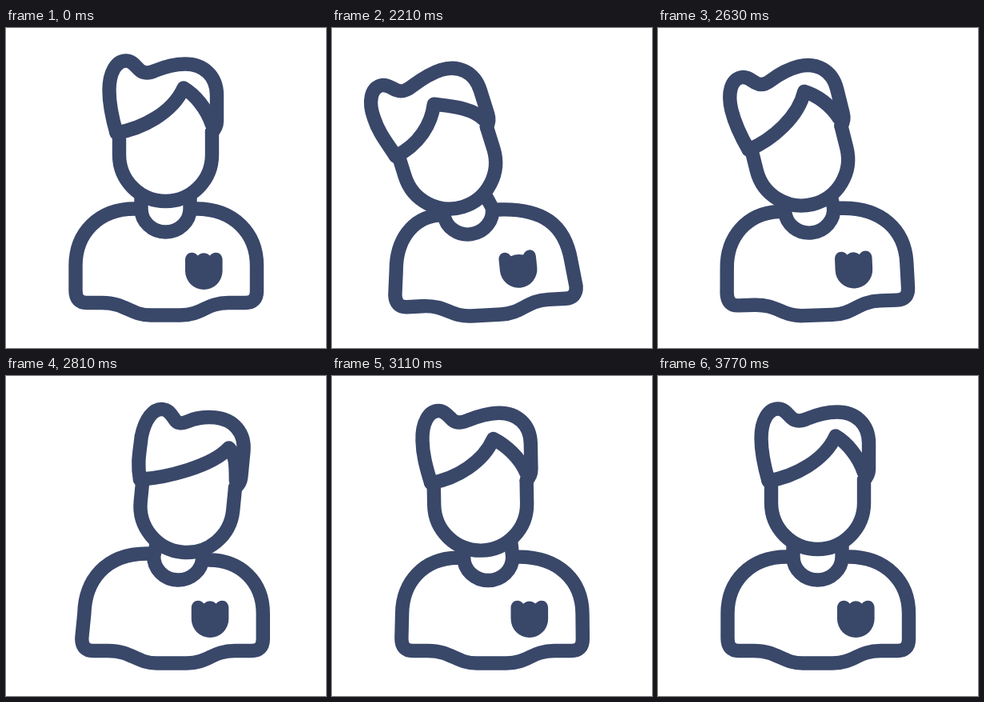
Write an HTML page that moves like this. It is 400x400 px and loops after 3800 ms.

```html
<!DOCTYPE html>
<html>
<head>
<meta charset="utf-8">
<style>
html, body { margin: 0; width: 100%; height: 100%; overflow: hidden; background: #fff; }
svg { display: block; width: 100%; height: 100%; }
path { fill: none; stroke: #394769; stroke-width: 17.4; stroke-linecap: round; stroke-linejoin: round; }
#face { fill: #fff; }
#badge { fill: #394769; stroke: none; }
</style>
</head>
<body>
<svg viewBox="0 0 400 400">
  <g id="torso">
    <path id="body"/>
    <path id="collar"/>
    <path id="badge"/>
  </g>
  <g id="head">
    <path id="face" d="M141.5 130V158.5a58 58 0 0 0 116 0V130"/>
    <path id="hair"/>
    <path id="fringe"/>
  </g>
</svg>
<script>
const LOOP = 3800;
const $ = id => document.getElementById(id);
const set = (id, name, value) => $(id).setAttribute(name, value);

// Each track: [time, value] pairs joined by sine easing
const SWAY = [[2000, 0], [2290, -64], [2440, -64], [2830, 27], [3180, -18], [3580, 4], [3780, 0]];
const TILT = [[2000, 0], [2290, -21], [2510, -21], [2880, 8], [3200, -3], [3590, 1.5], [3780, 0]];
const TURN = [[2000, 0], [2290, -23], [2420, -23], [2830, 23], [3180, -8], [3580, 3], [3780, 0]];

function at(track, t) {
  const i = track.findIndex(k => k[0] > t);
  if (i < 1) return 0;
  const [t0, a] = track[i - 1], [t1, b] = track[i];
  return a + (b - a) * (1 - Math.cos(Math.PI * (t - t0) / (t1 - t0))) / 2;
}

function drawTorso(sway, tilt) {
  const left = Math.max(0, -sway) / 53, right = Math.max(0, sway) / 26;
  const pull = left * left;
  const shift = sway * .3, lean = sway * .15;
  const slide = 7.5 * (right * right - pull * left);
  const roll = tilt < 0 ? -.01 * tilt * tilt : 0;
  set('torso', 'transform', `translate(${slide} 0) rotate(${roll} 200 343)`);

  set('body', 'd', `M${161 + shift} ${226 + 5 * left - 4 * right}
    C${115 - left} ${226 + 7 * left - 4 * right} ${87 + 5 * left + 4 * right} ${257 + 2 * left} ${87 + 3 * left + 3 * right} 297
    L87 328Q87 343.5 101 343.5H120C150 343.5 155 359 181 359H218C245 359 250 343.5 278 343.5H299Q313.5 343.5 313.5 329
    L${313.5 - 4.5 * pull} 297
    C${313.5 - 10 * pull} ${257 - 7 * pull} ${285 - 9 * pull} ${226 + 3 * pull + 4 * right} ${238 + shift} ${226 + 2 * pull + 4 * right}`);

  set('collar', 'd', `M${169 + lean} 205L169 226a30.5 29 0 0 0 61 0L${230 + lean} 205`);
  set('collar', 'transform', `translate(${shift} ${2 * left}) rotate(${tilt * .3} 199.5 226)`);

  const sag = Math.min(1, pull);
  set('badge', 'd', `M224 290C224 280 235 278 239.5 ${284.5 + 2 * sag}
    Q247.3 ${278 + 6 * sag} 255 ${284.5 + 2 * sag}C260 278 270.6 280 270.6 290V303.7a23.3 23.3 0 0 1-46.6 0Z`);
  set('badge', 'transform', `translate(${-4.5 * pull} 0) rotate(${-3 * pull} 247 304)`);
}

function drawHead(sway, tilt, turn) {
  const drop = Math.abs(sway) * .1;
  const dip = Math.abs(turn) * .15 + drop, tuft = turn * (turn > 0 ? .35 : .2);
  set('head', 'transform', `translate(${sway} ${Math.abs(tilt) * .25 + drop}) rotate(${tilt} 199.5 158.5)`);

  set('hair', 'd', `M138 131C132 110 ${129 + tuft * .7} 95 ${129 + tuft * .7} 78
    C${129 + tuft} 55 ${138 + tuft} 41 ${150 + tuft} 41
    C${158 + tuft} 41 ${162 + tuft} 48 ${167 + tuft * .9} 52.5
    C${172 + tuft * .7} 57 ${178 + tuft * .7} 57 ${186 + tuft * .5} 53.5
    C197 49 210 45 224 45C247 45 263.5 60 263.5 84V116Q263.5 124 257.5 130`);

  const x = 222 + turn, y = 75 + dip;
  set('fringe', 'd', `M138 131C170 126 ${208 + turn * .8} 106 ${x} ${y}
    C${236 + turn * .8} ${y + 8} ${251 + turn * .2} 101 257.5 121`);
}

function frame(now) {
  const t = now % LOOP;
  const sway = at(SWAY, t), tilt = at(TILT, t);
  drawTorso(sway, tilt);
  drawHead(sway, tilt, at(TURN, t));
  requestAnimationFrame(frame);
}
frame(0);
</script>
</body>
</html>
```
